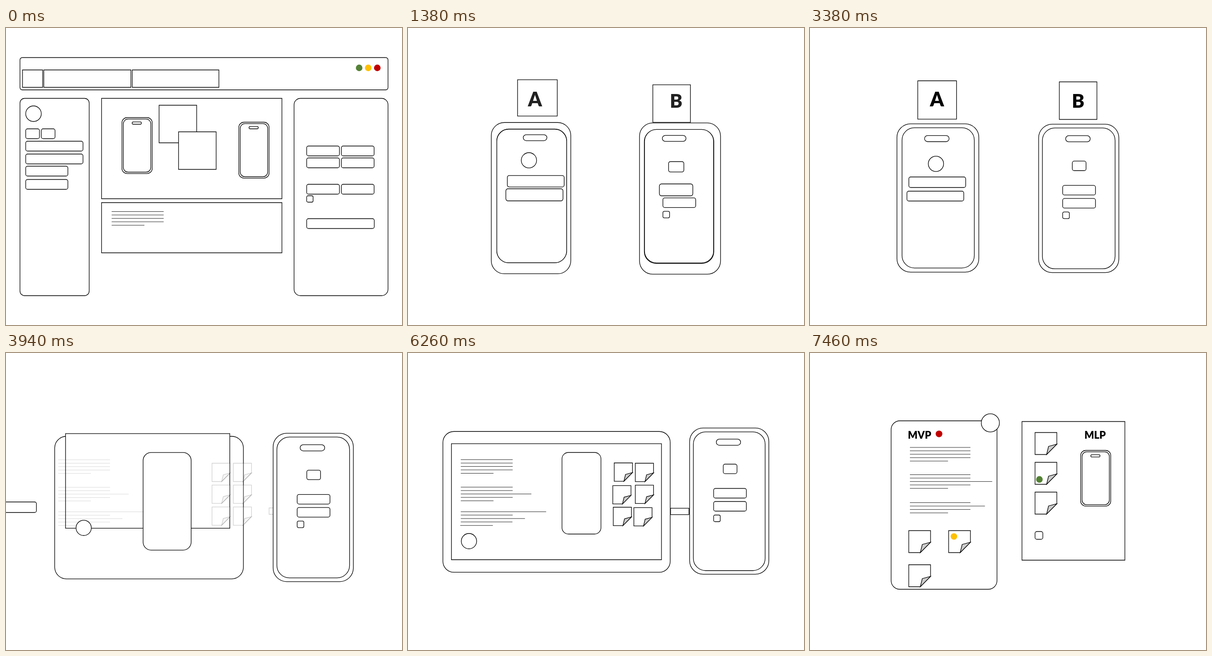
Write an HTML page with a canvas that moves like this. It is 864 px wide and 648 px high and loops after 8 s.

```html
<!DOCTYPE html>
<html lang="en">
<head>
<meta charset="utf-8">
<title>Wireframe morph</title>
<style>
html, body { margin: 0; width: 100%; height: 100%; overflow: hidden; background: #fff; }
canvas { display: block; width: 864px; height: 648px; }
</style>
</head>
<body>
<canvas id="stage" width="864" height="648"></canvas>
<script>
const ctx = document.getElementById('stage').getContext('2d');
const LOOP = 8000, STEP = 40, STEPS = 31;
const GREEN = '#548235', AMBER = '#ffc000', RED = '#c00000';

const clamp = v => Math.max(0, Math.min(1, v));
const mix = (a, b, p) => a.map((v, i) => v + ((b[i] ?? 0) - v) * p);
const times = (n, make) => Array.from({ length: n }, (_, i) => make(i));

// Cubic bezier easing, solved for its parameter by bisection
function ease(x) {
  if (x <= 0 || x >= 1) return clamp(x);
  const curve = (s, a, b) => 3 * s * (1 - s) ** 2 * a + 3 * s * s * (1 - s) * b + s ** 3;
  let lo = 0, hi = 1;
  for (let i = 0; i < 30; i++) {
    const mid = (lo + hi) / 2;
    if (curve(mid, 0.2, 0.35) < x) lo = mid; else hi = mid;
  }
  return curve(lo, 0.02, 1);
}

function shape(fill, stroke = true) {
  ctx.fill();
  if (stroke) ctx.stroke();
}

// Painters: a pose is a short list of numbers
const paint = {
  // x, y, width, height, radius, vertical stretch of the outline
  box([x, y, w, h, r = 0, k = 1]) {
    ctx.save();
    ctx.translate(x, y);
    ctx.scale(1, k);
    ctx.beginPath();
    ctx.roundRect(0, 0, w, h / k, Math.max(0, Math.min(r, w / 2, h / k / 2)));
    ctx.fill();
    ctx.stroke();
    ctx.restore();
  },
  // centre, radius
  ring([x, y, r], o) {
    ctx.beginPath();
    ctx.arc(x, y, r, 0, 7);
    if (o.color) ctx.fillStyle = o.color;
    ctx.fill();
    if (!o.color) ctx.stroke();
  },
  // x, y, length
  line([x, y, w]) {
    ctx.lineWidth = 0.85;
    ctx.beginPath();
    ctx.moveTo(x, y);
    ctx.lineTo(x + w, y);
    ctx.stroke();
  },
  // x, y, size
  note([x, y, s]) {
    const path = (...pts) => {
      ctx.beginPath();
      pts.forEach(([u, v]) => ctx.lineTo(x + u * s * 0.99, y + v * s));
      ctx.closePath();
      ctx.fill();
      ctx.stroke();
    };
    path([0, 0], [1, 0], [1, 0.53], [0.53, 1], [0, 1]);
    ctx.fillStyle = '#ccc';
    path([1, 0.53], [0.62, 0.63], [0.53, 1]);
  },
  // centre x, baseline, size
  text([x, y, size], o) {
    ctx.fillStyle = '#000';
    ctx.font = `900 ${size}px Lato, "Open Sans", sans-serif`;
    ctx.textAlign = 'center';
    ctx.fillText(o.label, x, y);
  }
};

// Item builders: a null pose fades the item in or out
const item = kind => (from, to, opt = {}) => ({ kind, from, to, ...opt });
const [box, ring, line, note, text] = ['box', 'ring', 'line', 'note', 'text'].map(item);
const leave = (make, poses) => poses.map(p => make(p, null));
const enter = (make, poses) => poses.map(p => make(null, p));

// Pose generators
const button = (x, y, w, h = 21.5) => [x, y, w, h, 4];
const shift = ([x, ...rest], dx) => [x + dx, ...rest];
const para = (x, y, w, parts = [1, 1, 1, 1, 0.63]) =>
  parts.map((part, i) => [x, y + i * 7.45, w * part]);

function phone(x, y, w) {
  const h = w * 1.85, gap = w * 0.047;
  return {
    outer: [x, y, w, h, w * 0.17],
    inner: [x + gap, y + gap, w - 2 * gap, h - 2 * gap, w * 0.155],
    notch: [x + w * 0.337, y + w * 0.143, w * 0.306, w * 0.077, w * 0.038]
  };
}

// Chip, two bars and a check box inside a large phone
const form = (x, y) => [
  button(x + 73.5, y + 80.5, 30, 20.8), button(x + 52.5, y + 133.5, 71.5, 21),
  button(x + 52.5, y + 162, 71.5, 21), [x + 52.5, y + 191.5, 14.5, 14.5, 3]
];

// Browser layout
const smallL = phone(253, 195.5, 66), smallR = phone(508, 205.5, 66);
const sideGrid = i => button(656 + 75.7 * (i % 2), [257.5, 283.5, 341][i >> 1], 71.5);
const lights = [GREEN, AMBER, RED].map((color, i) => ring([770.5 + 19.8 * i, 87, 7.2], null, { color }));

// Two phones
const left = phone(191, 209.5, 175), right = phone(497.5, 210.5, 175);
const fields = form(497.5, 210.5);
const avatar = [276.5, 295, 16.7];
const barL1 = button(220, 325, 124, 23), barL2 = button(217, 356, 124);
const tagA = [236.8, 114.3, 80.2, 81.7], tagB = [544, 117.5, 82, 82];
const letterA = [277, 170.5, 43], letterB = [585, 173.5, 41];

// Tablet and phone
const tablet = [75, 171.5, 499, 306.5, 24], screen = [90.5, 198.5, 461, 252.5];
const sheet = [336, 217, 85, 178, 14], link = [574, 338, 40, 14];
const linked = phone(614.3, 162, 175), linkedFields = form(614.3, 162);
const face = [130, 413.5, 16.7];
const grid = times(6, i => [449.5 + 46.5 * (i % 2), 240.5 + 47.7 * (i >> 1), 40]);
const copy = [...para(114, 233, 113), ...para(114, 293, 113, [1, 1, 1.36, 1, 0.63]),
  ...para(114, 346.5, 113, [1.65, 1, 1.24, 1, 0.63])];

// Two documents
const last = phone(590.5, 212.5, 65.7);
const column = times(3, i => [491, 173.5 + 65 * i, 48]);
const corner = times(3, i => [215.5 + 87 * (i % 2), 387.5 + 74.5 * (i >> 1), 48]);
const [head, next, ...tail] = para(218, 326.5, 132, [1, 1.24, 1, 0.63]);
const copyEnd = [...para(218, 206, 132), ...para(218, 265.5, 132, [1, 1, 1.36, 1, 0.63]),
  next, head, ...tail];

// swell: extra width, height and drop reached at progress q
// late: sideways lag near the end of the move
const morphs = [
  { start: 500, q: 0.372, items: [
    ...leave(box, [[30.5, 64.5, 803, 70.5, 5], [36, 91.5, 44, 38], [82.5, 91.5, 190, 38],
      [208.5, 153.5, 393.5, 219], [208.5, 381, 393.5, 109.5]]),
    box([275.5, 91.5, 189, 38], tagA),
    ...lights,
    ...leave(line, para(230.5, 400.5, 113.5)),
    box([30.5, 153.5, 151, 430.5, 10], left.outer),
    box([628.5, 153.5, 205, 430.5, 14], right.outer),
    ...leave(box, [button(43, 220, 30), button(77, 220, 30), button(43, 301.5, 92), button(43, 330.5, 92)]),
    ...leave(box, [[334, 168.5, 82, 82]]),
    box([376.5, 226.5, 82, 82], tagB),
    box(smallL.outer, left.inner, { swell: [-17, -105, -10], late: -9 }),
    box(smallL.inner, left.inner, { swell: [-9, -105, -2], late: -9 }),
    box(smallL.notch, left.notch),
    ring([60, 187, 17], avatar),
    box(button(43, 247, 125), barL1, { swell: [0, 45, 10], late: 7 }),
    box(button(43, 275, 125), barL2, { swell: [14, 106, 0], late: 7 }),
    box(smallR.outer, right.inner, { swell: [-32, -105, -7], late: 9 }),
    box(smallR.inner, right.inner, { swell: [-47, -105, -26], late: 9 }),
    box(smallR.notch, right.notch),
    ...leave(box, [sideGrid(1), sideGrid(3), sideGrid(5), button(656, 416, 147.5)]),
    box(sideGrid(0), fields[0], { swell: [20, 40, 30], late: -7 }),
    box(sideGrid(2), fields[1], { swell: [33, 106, 7], late: -7 }),
    box(sideGrid(4), fields[2]),
    box([656, 366, 14, 14, 3], fields[3]),
    text(null, letterA, { label: 'A' }),
    text(null, letterB, { label: 'B' })
  ] },
  { start: 3380, q: 0.5, items: [
    box(left.outer, tablet),
    box(tagA, screen),
    text(letterA, null, { label: 'A' }),
    box(tagB, null),
    text(letterB, null, { label: 'B' }),
    box(left.inner, sheet),
    box(left.notch, null),
    ...enter(line, copy),
    ...enter(note, grid),
    ring(avatar, face),
    box(barL1, shift(barL1, -380)),
    box(barL2, shift(barL2, -480)),
    box(null, link),
    ...Object.keys(right).map(part => box(right[part], linked[part])),
    ...fields.map((f, i) => box(f, linkedFields[i]))
  ] },
  { start: 6260, q: 0.692, items: [
    box(tablet, [177, 148, 231, 367.5, 19]),
    box(screen, [462.5, 149.5, 224.5, 302.5]),
    text(null, [239, 187, 22], { label: 'MVP' }),
    text(null, [622, 187, 22], { label: 'MLP' }),
    box(sheet, null),
    ...copy.map((p, i) => line(p, copyEnd[i] || null)),
    ...[0, 1, 3, 2, 4, 5].map((from, i) => note(grid[from], [...column, ...corner][i])),
    ring(face, [393.5, 152.5, 19.8]),
    box([...link, 0], [491, 389.5, 17, 17, 4], { swell: [10, 0, 0] }),
    box(linked.outer, last.outer, { swell: [-31, -93, -6] }),
    box(linked.inner, last.inner, { swell: [-26, -86, 4] }),
    box(linked.notch, last.notch, { swell: [-7, 2, 17] }),
    ...leave(box, linkedFields),
    ring(null, [281.5, 176.5, 7.3], { color: RED }),
    ring(null, [314, 400.3, 7.1], { color: AMBER }),
    ring(null, [500.5, 275.8, 7.2], { color: GREEN })
  ] }
];

function poseOf({ from, to, swell, late }, p, q) {
  const pose = mix(from, to, p);
  if (swell) {
    const bump = p / q * ((1 - p) / (1 - q)) ** ((1 - q) / q);
    const [dw, dh, dy] = swell.map(v => v * bump);
    const ratio = (pose[3] + dh) / pose[3];
    pose[0] -= dw / 2;
    pose[1] += dy - dh / 2;
    pose[2] += dw;
    pose[3] += dh;
    pose[4] *= ratio ** 0.4;
    pose[5] = Math.max(1, ratio ** 0.55);
  }
  if (late) {
    const lag = p < 0.943 ? clamp((p - 0.5) / 0.443) : (1 - p) / 0.057;
    pose[0] += late * lag;
    pose[1] += 2 * lag;
  }
  return pose;
}

function draw(t) {
  const m = t < 3380 ? morphs[0] : t < 6260 ? morphs[1] : morphs[2];
  const x = clamp((Math.floor((t - m.start) / STEP) + 1) / STEPS);
  const p = ease(x);
  const fadeOut = 1 - clamp(x / 0.25) ** 2, fadeIn = clamp((x - 0.414) / 0.376);
  ctx.globalAlpha = 1;
  ctx.fillStyle = '#fff';
  ctx.fillRect(0, 0, 864, 648);
  for (const it of m.items) {
    const alpha = !it.to ? fadeOut : !it.from ? fadeIn : 1;
    if (alpha <= 0) continue;
    ctx.globalAlpha = alpha;
    ctx.fillStyle = '#fff';
    ctx.strokeStyle = '#000';
    ctx.lineWidth = 1.3;
    paint[it.kind](it.from && it.to ? poseOf(it, p, m.q) : it.from || it.to, it);
  }
}

const origin = performance.now();
function tick() {
  draw((performance.now() - origin) % LOOP);
  requestAnimationFrame(tick);
}
tick();
</script>
</body>
</html>
```
